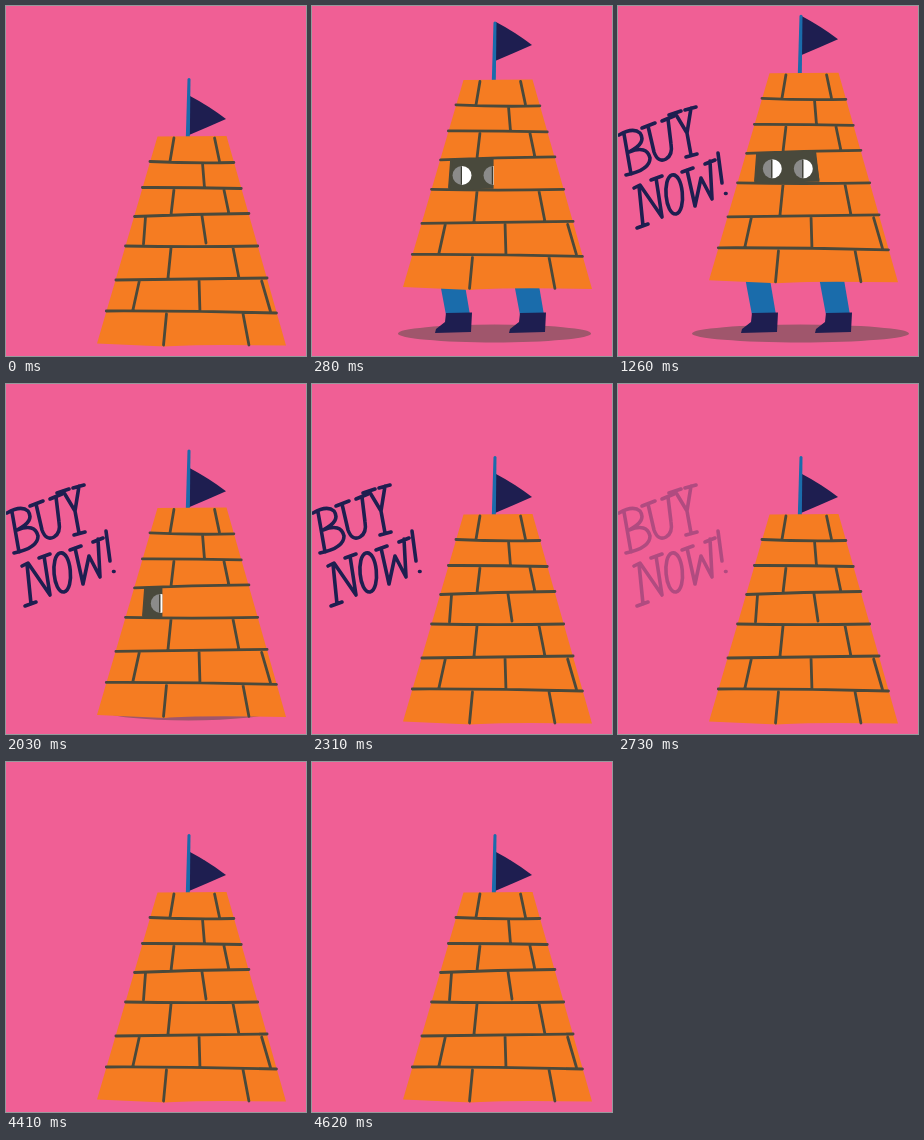
An HTML page for the animation above (6160 ms loop, 300 px wide and 350 px high).

```html
<!DOCTYPE html>
<html lang="en">
<head>
<meta charset="utf-8">
<title>Buy now</title>
<style>
  html, body { margin: 0; width: 100%; height: 100%; overflow: hidden; background: #f05f95; }
  svg { display: block; width: 100%; height: 100%; }
  .ink { fill: none; stroke: #1e1e50; stroke-width: 3.6; stroke-linecap: round; stroke-linejoin: round; }
  .mortar { fill: none; stroke: #4a493b; stroke-width: 2.8; stroke-linecap: round; }
  .navy { fill: #1e1e50; }
  .blue { fill: #1a6cab; }
</style>
</head>
<body>
<svg viewBox="0 0 300 350" role="img" aria-label="Buy now!">
  <defs>
    <clipPath id="gap"><rect id="gapRect" x="130" y="200" height="50" width="0"/></clipPath>
    <g id="eye">
      <path fill="#8b8b8a" d="M0-9.5A9.5 9.5 0 0 0 0 9.5Z"/>
      <path fill="#fff" d="M0-9.5A9.5 9.5 0 0 1 0 9.5Z"/>
      <path stroke="#3c3c34" stroke-width="1.2" d="M-.6-9V9"/>
    </g>
    <g id="leg">
      <path class="blue" d="M123 250 148 250 158 309 134 309Z"/>
      <path class="navy" d="M134 307 160 306.500 159 326 123 327 124 323 133 316Z"/>
    </g>
  </defs>

  <g id="text" class="ink">
    <!-- BUY -->
    <path d="M1 129Q15 121 22 127Q29 137 11 146Q29 139 32 152Q32 164 8 169M6 128 13 168"/>
    <path d="M24 122 37 117M30 120 36 146Q40 157 48 153Q55 149 53 138L50 113M44 115 56 110"/>
    <path d="M51 109 63 105M57 107 69 127 73 102M67 104 78 101M69 127 73 149M68 151 79 148"/>
    <!-- NOW! -->
    <path d="M16 182 22 179 44 211 38 172M33 174 44 170M21 180 25 220M19 222 30 218"/>
    <path d="M54 169C44 172 47 209 58 208C69 205 65 166 54 169Z"/>
    <path d="M64 166 75 162M69 164 77 200 83 172 94 193 92 155M87 158 97 154"/>
    <path d="M100 147 104 177M107.500 187.500h.6"/>
  </g>

  <ellipse id="shadow" cx="182.500" cy="327.500" ry="9" fill="#a0566c"/>
  <use href="#leg"/>
  <use href="#leg" x="74"/>

  <g id="tower">
    <path id="flag" class="navy" d="M184 90Q203 100 220 113Q202 121 183 129Z"/>
    <path class="blue" d="M181.500 73Q183 71 184.500 73L183.800 132H179.800Z"/>
    <path fill="#f57c22" d="M151.500 130.500 220.500 130 280 339.500Q185 338 159 340.500L91 337.500Z"/>
    <path id="mortar" class="mortar"/>
    <g clip-path="url(#gap)">
      <path fill="#49493c" d="M139 210 198 208 201.500 239 136.500 240Z"/>
      <use id="eyeL" href="#eye" y="226"/>
      <use id="eyeR" href="#eye" y="226"/>
    </g>
    <path class="mortar" d="M139.500 211 137.500 238"/>
    <path id="jamb" class="mortar" d="M196 210 200 237"/>
  </g>
</svg>
<script>
const LOOP = 6160, STEP = 70, MOVE = 560;
const SHUT = 1820 - STEP, FADE = 2450 - STEP;
const $ = id => document.getElementById(id);
const set = (id, name, v) => $(id).setAttribute(name, v);
const clamp = v => Math.min(1, Math.max(0, v));
const smooth = v => (v = clamp(v), v * v * (3 - 2 * v));

// Each course: top, height, tilt of its lower joint, upright joints
const courses = [
  [130, 26, 1, [166, 211]],
  [156, 26, 1, [197.5]],
  [182, 27, -3, [166.5, 220.5]],
  [209, 31, 0, []],
  [240, 33, -2, [163.5, 230]],
  [273, 33, 2, [130, 193.5, 260]],
  [306, 34, 0, [159, 240]]
];

function drawMortar() {
  const left = y => 151.5 - (y - 130) * .291;
  const right = y => 220.5 + (y - 130) * .284;
  let d = '';
  courses.forEach(([top, h, tilt, uprights], i) => {
    const base = top + h, mid = top + h / 2;
    for (const x of uprights) {
      // Uprights lean towards the point where the sides would meet
      const lean = (x - 186) / (mid - 9) * h / 2;
      d += `M${x - lean} ${top + 2}L${x + lean} ${base - 1}`;
    }
    if (i < courses.length - 1) {
      d += `M${left(base)} ${base - tilt / 2}`
         + `Q186 ${base + 1.5 * Math.cos(i * 2)} ${right(base)} ${base + tilt / 2}`;
    }
  });
  set('mortar', 'd', d);
}

const slide = u => smooth(u ** (2 / 3));
const spring = u => slide(u) + .41 * u * Math.sin(Math.PI * u);

function pose(t) {
  const closing = t > SHUT;
  const u = clamp((closing ? t - SHUT : t) / MOVE);
  const phase = v => closing ? 1 - v : v;
  const open = phase(slide(u));

  set('tower', 'transform', `translate(0 ${-63.2 * phase(spring(u))})`);
  set('flag', 'transform', `translate(0 ${-16.5 * phase(spring(clamp(u * 1.25)))})`);
  set('shadow', 'rx', 70 + 38.5 * open);

  set('gapRect', 'width', open > 0 ? 6 + 66 * open : 0);
  set('jamb', 'visibility', u < 1 && u > 0 ? 'hidden' : 'visible');
  const look = 150 + 4.3 * smooth((t - 980) / 280);
  set('eyeL', 'x', look);
  set('eyeR', 'x', look + 31);

  const ink = t < FADE ? clamp(t / 280 - 1) : clamp(1 - (t - FADE) / 630) ** 1.5;
  set('text', 'opacity', ink);
}

const start = performance.now();
function tick(now) {
  const t = Math.max(0, now - start) % LOOP;
  pose(Math.floor(t / STEP) * STEP);
  requestAnimationFrame(tick);
}
drawMortar();
pose(0);
requestAnimationFrame(tick);
</script>
</body>
</html>
```
